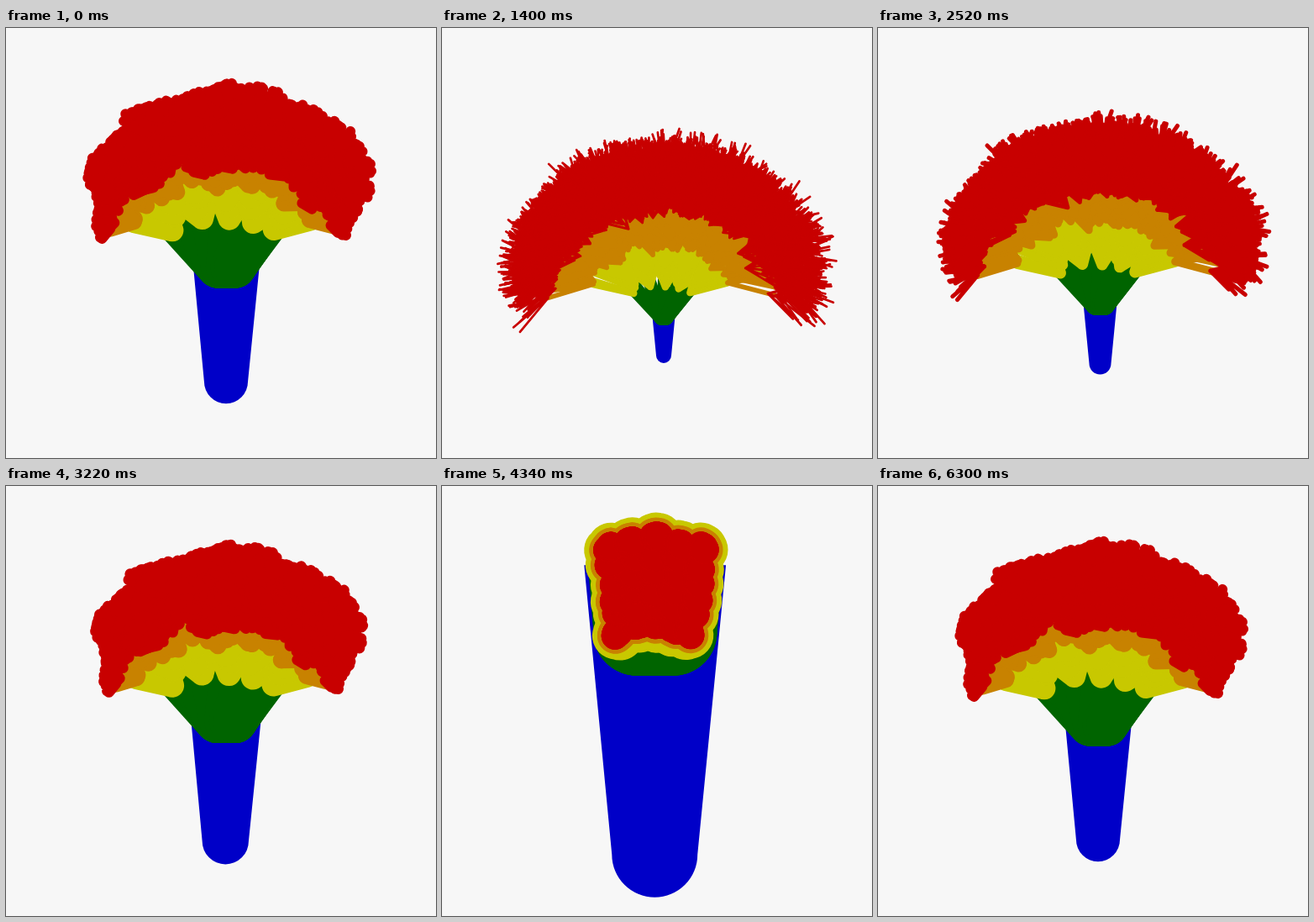
An HTML page with a canvas that plays this animation: 512 by 512 pixels, repeating every 6370 ms.

```html
<!DOCTYPE html>
<html lang="en">
<head>
<meta charset="utf-8">
<title>Branching tree</title>
<style>
html, body { margin: 0; width: 100%; height: 100%; overflow: hidden; background: #f7f7f7; }
canvas { display: block; width: 100vmin; height: 100vmin; }
</style>
</head>
<body>
<canvas id="stage" width="512" height="512"></canvas>
<script>
const ctx = document.getElementById('stage').getContext('2d');
const STEP = 70, STEPS = 91;
const COLORS = ['#0000c8', '#006400', '#c8c800', '#c88200', '#c80000'];
const radians = degrees => degrees * Math.PI / 180;
const FIRST_SPREAD = radians(42), SPREAD = radians(28);

let seed = 20;
function rand() {
  seed = (seed * 1664525 + 1013904223) >>> 0;
  return seed / 4294967296;
}
const jitter = size => (rand() * 2 - 1) * size;

// A node holds its sideways turn u (-1..1), depth v (0 front, 1 back) and length factor.
function grow(level, cols, rows, wobble) {
  const nodes = [];
  for (let r = 0; r < rows; r++) {
    for (let c = 0; c < cols; c++) {
      const u = c / (cols - 1) * 2 - 1 + jitter(wobble);
      const v = r / (rows - 1) + jitter(wobble / 3);
      const size = 1 + jitter(level === 1 ? 0.04 : 0.16);
      nodes.push({ u, v, size, kids: level < 4 ? grow(level + 1, 3, 2, 0.3) : [] });
    }
  }
  return nodes;
}
const tree = grow(1, 5, 6, 0.08);

// Piecewise linear through rows of [key, ...values], extended past both ends.
function along(rows, key) {
  let i = 0;
  while (i < rows.length - 2 && key > rows[i + 1][0]) i++;
  const a = rows[i], b = rows[i + 1], k = (key - a[0]) / (b[0] - a[0]);
  return a.slice(1).map((value, j) => value + (b[j + 1] - value) * k);
}
const SCALE = [[-0.86, 58.5], [0, 55], [0.588, 45], [0.985, 44.4]];
// foot radius: foot x, foot y, crown radius, crown x, crown y
const TRUNK = [
  [9, 264, 390, 12.5, 264, 346],
  [13, 264.5, 399.5, 20, 264.5, 329.5],
  [26, 262, 421, 40, 262.5, 285],
  [28.3, 261, 423.5, 43, 262, 278],
  [47.5, 255, 437.5, 78, 256, 190],
  [50.5, 253.5, 438.5, 83, 254, 176]
];

function drawTrunk(r0, x0, y0, r1, x1, y1) {
  const top = y1 - 0.95 * r1, half = r0 + 0.097 * (y0 - top);
  ctx.fillStyle = COLORS[0];
  ctx.beginPath();
  ctx.moveTo(x1 - half, top);
  ctx.lineTo(x1 + half, top);
  ctx.lineTo(x0 + r0, y0);
  ctx.arc(x0, y0, r0, 0, Math.PI);
  ctx.fill();
}

// Outline around two circles of different size.
function taper(x0, y0, r0, x1, y1, r1) {
  const dist = Math.hypot(x1 - x0, y1 - y0);
  ctx.beginPath();
  if (dist <= r0 - r1) {
    ctx.arc(x0, y0, r0, 0, 2 * Math.PI);
  } else {
    const dir = Math.atan2(y1 - y0, x1 - x0), turn = Math.acos((r0 - r1) / dist);
    ctx.arc(x0, y0, r0, dir + turn, dir - turn);
    ctx.arc(x1, y1, r1, dir - turn, dir + turn);
  }
  ctx.fill();
}

function draw(s) {
  const ratio = 0.55 + 0.45 * s;
  const sum = 1 + ratio * (1 + ratio * (1 + ratio * (1 + ratio)));
  const r0 = along(SCALE, s)[0] / sum;
  const [x0, y0, r1, x1, y1] = along(TRUNK, r0);
  const widths = [0, 0, 0.335, 0.24 - 0.015 * s, 0.152 - 0.045 * s].map(w => w * r1 * 2);

  ctx.fillStyle = '#f7f7f7';
  ctx.fillRect(0, 0, 512, 512);
  drawTrunk(r0, x0, y0, r1, x1, y1);

  let length = 1.21 * (y0 - y1) * ratio;
  ctx.fillStyle = COLORS[1];
  let ends = tree.map(node => {
    const { u, v, size, kids } = node;
    const angle = u * FIRST_SPREAD;
    const reach = length * size * (0.81 + 0.1 * u * u * (1 - v) + 0.18 * v);
    const x = x1 + reach * Math.sin(angle) + u * (0.17 + 0.1 * v) * r1;
    const y = y1 - reach * Math.cos(angle) + (0.38 - 1.14 * v) * r1;
    taper(x1 + u * 0.25 * r1, y1, 0.62 * r1, x, y, 0.355 * r1);
    return { x, y, angle, kids };
  });

  ctx.lineCap = 'round';
  for (let level = 2; level < 5; level++) {
    length *= ratio;
    ctx.strokeStyle = COLORS[level];
    ctx.lineWidth = widths[level];
    const next = [];
    for (const parent of ends) {
      ctx.beginPath();
      for (const { u, v, size, kids } of parent.kids) {
        const angle = parent.angle + u * SPREAD;
        const reach = length * size * (0.91 + 0.09 * v);
        const x = parent.x + reach * Math.sin(angle);
        const y = parent.y - reach * Math.cos(angle);
        ctx.moveTo(parent.x, parent.y);
        ctx.lineTo(x, y);
        next.push({ x, y, angle, kids });
      }
      ctx.stroke();
    }
    ends = next;
  }
}

let shown = -1;
const start = performance.now();
function tick() {
  const step = Math.floor((performance.now() - start) / STEP) % STEPS;
  if (step !== shown) {
    shown = step;
    draw(Math.sin(2 * Math.PI * step / (STEPS - 1)));
  }
  requestAnimationFrame(tick);
}
tick();
</script>
</body>
</html>
```
